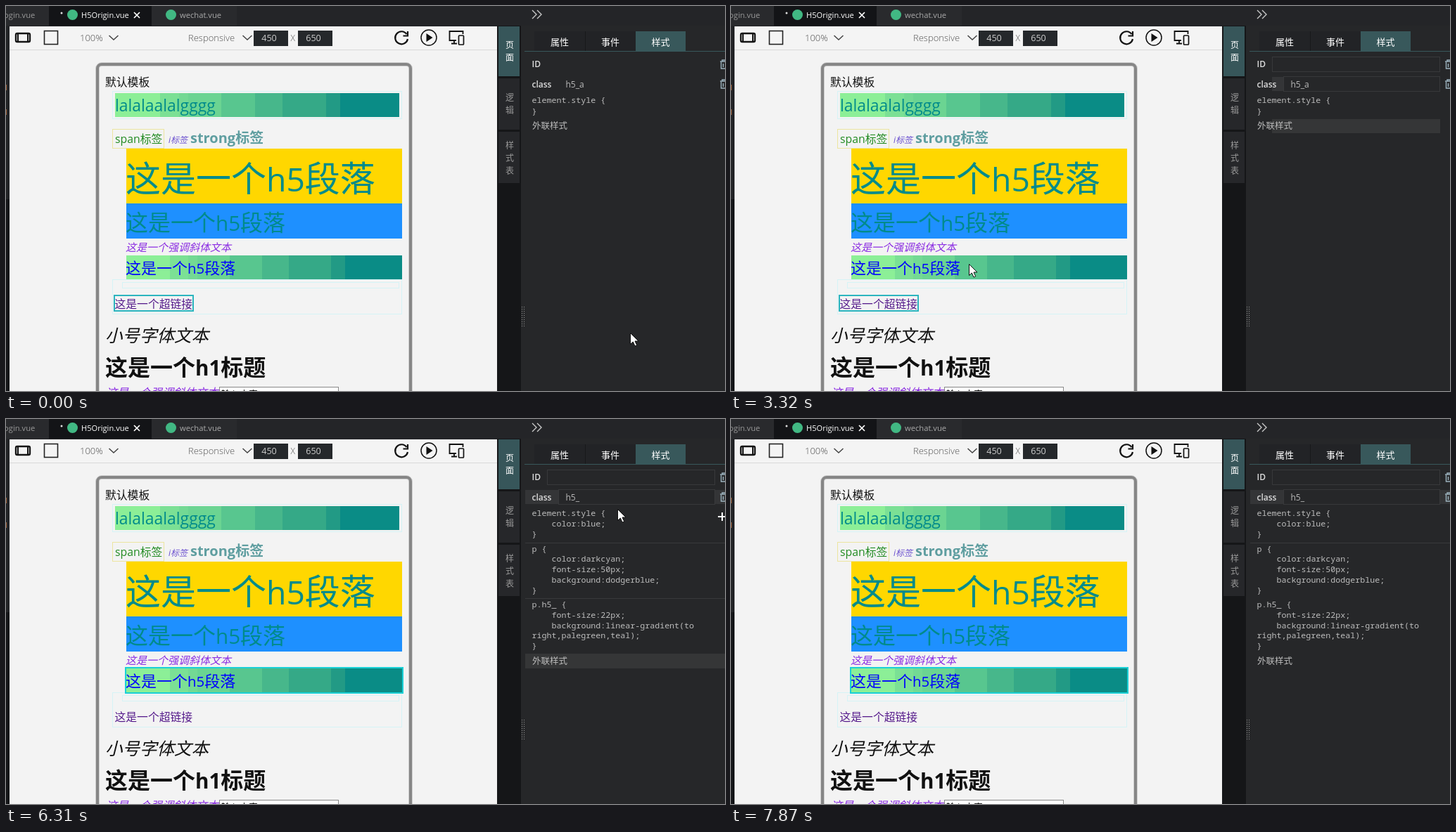
An HTML page for the animation above (8430 ms loop, 1022x548 px).

```html
<!DOCTYPE html>
<html lang="zh-CN">
<head>
<meta charset="utf-8">
<title>H5 style editor</title>
<style>
  html, body { margin: 0; width: 100%; height: 100%; overflow: hidden; background: #252629; }
  svg { display: block; width: 100%; height: 100%; }
  text { font-family: 'Open Sans', 'Noto Sans CJK SC', 'Noto Sans CJK', sans-serif; white-space: pre; }
  .code { font: 11.65px 'Noto Sans Mono', 'DejaVu Sans Mono', monospace; fill: #bdbdbd; }
</style>
</head>
<body>
<svg id="stage" viewBox="0 0 1022 548" preserveAspectRatio="none"></svg>
<script>
const LOOP = 8430;
const stage = document.getElementById('stage');

// Drawing helpers
const rect = (x, y, w, h, fill, extra = '') =>
  `<rect x="${x}" y="${y}" width="${w}" height="${h}" fill="${fill}" ${extra}/>`;
const frame = (x, y, w, h, color, width = 1, extra = '') =>
  rect(x, y, w, h, 'none', `stroke="${color}" stroke-width="${width}" ${extra}`);
const line = (d, color, width = 1, fill = 'none') =>
  `<path d="${d}" fill="${fill}" stroke="${color}" stroke-width="${width}"/>`;
const text = (s, x, y, size, fill, extra = '') =>
  `<text x="${x}" y="${y}" font-size="${size}" fill="${fill}" ${extra}>${s}</text>`;
const group = (id, body) => `<g id="${id}">${body}</g>`;
const bold = 'font-weight="700"', semi = 'font-weight="600"', light = 'font-weight="300"';
const italic = 'font-style="italic"', mid = 'text-anchor="middle"';

const heading = (a, b, c, x, y, size, fill, extra) =>
  text(`${a}<tspan font-size=".925em">${b}</tspan>${c}`, x, y, size, fill, extra);
const paragraph = (y, size, fill) => heading('这是一个', 'h5', '段落', 170, y, size, fill);

const code = (lines, y) => lines.map((s, i) => {
  const indent = s.startsWith('  ') ? 28 : 0;
  return `<text class="code" x="${747.5 + indent}" y="${y + i * 14.8}">${s.trim()}</text>`;
}).join('');

const bands = () => {
  const edges = [0, .158, .225, .257, .375, .493, .59, .743, .793, 1];
  const colors = ['#8cef97', '#7be095', '#73d994', '#6bd492', '#58c68f', '#47b78b', '#35a987', '#229a85', '#0a8c86'];
  return '<linearGradient id="bands">' + colors.map((c, i) =>
    `<stop offset="${edges[i]}" stop-color="${c}"/><stop offset="${edges[i + 1]}" stop-color="${c}"/>`
  ).join('') + '</linearGradient>';
};

const trash = y => line(`M1015 ${y + 2}h10M1018 ${y + 2}v-2h6M1016.5 ${y + 3}v9h8M1019.5 ${y + 5}v5`, '#9db4c0', 1.4);
const plus = (x, y) => line(`M${x - 6} ${y}h12M${x} ${y - 6}v12`, '#fff', 2);
const chevron = (x, y) => line(`M${x} ${y}l6.5 6 6.5-6`, '#444', 1.5);

function tabs() {
  return rect(0, 0, 1022, 29, '#242528')
    + rect(0, 0, 328, 28, '#292a2d') + rect(61, 0, 146, 28, '#131417')
    + text('ogin.vue', -3, 17, 11.2, '#999')
    + '<circle cx="79" cy="10" r="1.5" fill="#ddd"/>'
    + '<circle cx="94.500" cy="12.500" r="7.500" fill="#41b883"/><circle cx="234.500" cy="12.500" r="7.500" fill="#41b883"/>'
    + text('H5Origin.vue', 107, 17, 11.1, '#fff')
    + line('M182 9l8 8m0-8l-8 8', '#fff', 1.7)
    + text('wechat.vue', 247, 17, 11.2, '#aaa')
    + line('M748 6l6 6-6 6M755 6l6 6-6 6', '#c8c8c8', 1.4);
}

function toolbar() {
  const field = (x, s) => rect(x, 35, 49, 22, '#25282b') + text(s, x + 22, 50, 12.6, '#ccc', mid);
  return rect(5, 28, 694, 35, '#f4f4f4') + rect(5, 62, 694, 1, '#d8d8d8')
    + frame(14, 39, 20, 12, '#151515', 2.4, 'rx="2"') + line('M17 39v12M31 39v12', '#151515', 2)
    + frame(54.5, 35.5, 19, 19, '#222', 1.6)
    + text('100%', 105, 50, 13, '#555', light) + chevron(146.500, 42)
    + text('Responsive', 259, 50, 13, '#555', light) + chevron(336.500, 42)
    + field(352, '450') + text('X', 404.500, 50, 12, '#555', light) + field(415, '650')
    + line('M569.500 40a9 9 0 1 0 1.500 7', '#111', 2.2) + line('M571 36v6.500h-6.500', '#111', 2.2)
    + '<circle cx="601" cy="45" r="11" fill="none" stroke="#111" stroke-width="1.500"/>'
    + '<path d="M597.500 39l9 6-9 6z" fill="#111"/>'
    + line('M640 49h-9.500v-13h19v4M633 53.500h8M637 49v4', '#111', 1.8)
    + rect(642, 41, 10, 15, '#f4f4f4') + frame(643.500, 42, 7, 13, '#111', 1.7, 'rx="1"');
}

function phone() {
  const pale = '#d5f3f6', teal = '#008b8b', violet = '#8a2be2';
  return frame(130, 83, 445, 500, '#d0d0d0', 6, 'rx="6"')
    + frame(130, 83, 445, 500, '#868686', 4, 'rx="6"')
    + text('默认模板', 141, 114, 15.8, '#111')
    + frame(151.5, 121.5, 411, 39, pale) + rect(155, 124, 404, 34, 'url(#bands)')
    + text('lalalaalalgggg', 155, 149.5, 22.9, teal)
    + frame(151.5, 175.5, 73, 27, '#ece5a0')
    + text('span标签', 155, 195, 15.8, '#228b22')
    + text('i标签', 231, 195, 12, '#6a4fcf', italic)
    + text('strong标签', 262, 195, 20, '#5f9ea0', bold)
    + rect(171, 203, 392, 78, '#ffd700') + rect(171, 281, 392, 50, '#1e90ff')
    + group('matched', rect(171, 203, 392, 128, '#b8d5eb'))
    + paragraph(263.5, 50, teal) + paragraph(319.5, 32, teal)
    + text('这是一个强调斜体文本', 170, 349, 15, violet, italic)
    + rect(171, 355, 392, 34, 'url(#bands)')
    + frame(151.5, 389.500, 411, 49, pale) + frame(165.5, 393.5, 393, 8, pale)
    + group('pickPara', frame(170, 354, 394, 36, '#1bd0d6', 2))
    + paragraph(381, 22, '#0000ff')
    + group('pickLink', frame(154, 412, 112, 22, '#2cb5bf', 2))
    + text('这是一个超链接', 154.500, 430, 15.8, '#551a8b')
    + text('小号字体文本', 141, 478, 24.5, '#111', italic)
    + heading('这是一个', 'h1', '标题', 141, 526, 32, '#111', bold)
    + text('这是一个强调斜体文本', 142, 556, 16, violet, italic)
    + rect(303.5, 542.5, 169, 20, '#fff', 'stroke="#888"')
    + text('输入内容', 306, 556.5, 13, '#111');
}

function sideTabs() {
  const tab = (y, h, fill, ink, chars, first) => rect(700, y, 30, h, fill)
    + [...chars].map((c, i) => text(c, 716, first + i * 18, 12, ink, mid)).join('');
  return rect(698, 28, 34, 520, '#151618')
    + tab(29, 71, '#37565a', '#fff', '页面', 60)
    + tab(103, 73, '#26272a', '#999', '逻辑', 135)
    + tab(179, 73, '#26272a', '#999', '样式表', 203);
}

function panel() {
  let grip = '';
  for (let y = 428; y < 458; y += 3) grip += rect(733, y, 1, 1, '#999') + rect(736, y, 1, 1, '#999');
  const external = y => text('外联样式', 748, y, 12.5, '#bdbdbd');
  const label = (s, x) => text(s, x, 56, 13, '#fff', `${mid} font-weight="500"`);
  return rect(732, 28, 290, 520, '#262729') + grip
    + rect(751, 36, 144, 28, '#222326') + rect(823, 36, 1, 28, '#17181a')
    + rect(895, 36, 71, 28, '#38585b') + rect(737, 64, 285, 1, '#38585b')
    + label('属性', 787) + label('事件', 859) + label('样式', 930.5)
    + group('inputs', rect(769, 101, 16, 20, '#343537')
      + frame(769.5, 72.5, 238, 21, '#38393b') + frame(785.5, 100.5, 222, 21, '#38393b'))
    + group('pickedRow', rect(738, 101, 47, 20, '#343537') + rect(1008, 101, 14, 20, '#343537'))
    + text('ID', 747.5, 87, 12, '#ddd', semi) + text('class', 747.5, 115.5, 12, '#ddd', semi)
    + `<text id="cls" x="795.500" y="115.500" font-size="12" fill="#bbb"></text>`
    + trash(77) + trash(105)
    + code(['element.style {'], 138)
    + group('plain', rect(769, 161, 239, 20, '#353637', 'id="hoverBar"')
      + code(['}'], 153.5) + external(175))
    + group('rules', code(['  color:blue;', '}'], 153)
      + rect(738, 176, 284, 1, '#38393b')
      + code(['p {', '  color:darkcyan;', '  font-size:50px;', '  background:dodgerblue;', '}'], 188.5)
      + code(['p.h5_ {', '  font-size:22px;', '  background:linear-gradient(to', 'right,palegreen,teal);', '}'], 268)
      + group('marks', rect(738, 255, 284, 1, '#38393b') + rect(738, 334, 284, 21, '#353637'))
      + external(348.5))
    + group('addStyle', plus(1018, 139))
    + group('addP', plus(995, 189) + trash(183))
    + group('addClass', plus(995, 268) + trash(262));
}

stage.innerHTML = `<defs>${bands()}</defs>`
  + rect(0, 0, 1022, 548, '#f3f3f3')
  + rect(0, 28, 5, 520, '#141518') + rect(0, 28, 5, 247, '#222326')
  + rect(0, 112, 1, 8, '#a5673f') + rect(0, 147, 1, 8, '#a5673f')
  + phone() + toolbar() + tabs() + sideTabs() + panel()
  + group('cursor', line('M.5 .5v16l3.800-3.500 2.700 6 2.700-1.200-2.700-5.800h5z', '#111', 1, '#fff'));

// Screen updates come in runs: start, end, steps
const runs = [
  [130, 1100, 8], [1220, 1640, 4], [2070, 3050, 8], [3170, 3740, 5],
  [4420, 4420, 1], [4940, 5880, 8], [6030, 7000, 8], [7150, 7870, 6]
];
const ticks = [0];
for (const [a, b, n] of runs)
  for (let i = 0; i < n; i++) ticks.push(a + (n > 1 ? i * (b - a) / (n - 1) : 0));

// Pointer path: time, x, y
const path = [
  [0, 887, 465], [130, 884, 470], [400, 859, 420], [680, 880, 270], [1100, 941, 92],
  [1220, 936, 92], [1360, 915, 172], [1500, 900, 330], [1640, 895, 424],
  [2070, 869, 517], [2350, 720, 480], [2770, 470, 400], [3050, 388, 366],
  [3740, 257, 369], [4800, 257, 369], [5080, 400, 400], [5360, 700, 432],
  [5640, 880, 250], [5745, 890, 108], [5880, 870, 140], [6307, 869, 128],
  [6446, 878, 220], [6584, 883, 347], [6723, 884, 431], [6861, 870, 330],
  [7000, 862, 290], [7294, 842, 225], [7582, 832, 199], [7726, 880, 483]
];

function pointer(t) {
  const i = path.findIndex(p => p[0] > t);
  if (i < 0) return path[path.length - 1].slice(1);
  const [t0, x0, y0] = path[i - 1], [t1, x1, y1] = path[i];
  const k = (t - t0) / (t1 - t0);
  return [Math.round(x0 + (x1 - x0) * k), Math.round(y0 + (y1 - y0) * k)];
}

const part = id => document.getElementById(id);
const show = (id, on) => part(id).setAttribute('display', on ? 'inline' : 'none');

function draw(time) {
  let t = 0;
  for (const tick of ticks) if (tick <= time + 13) t = tick;
  const [x, y] = pointer(t);
  const picked = t >= 4420;
  const over = (top, bottom) => t >= 4940 && t < 7860 && x > 738 && y >= top && y < bottom;

  part('cursor').setAttribute('transform', `translate(${x} ${y})`);
  show('cursor', t < 7860);
  part('cls').textContent = picked ? 'h5_' : 'h5_a';
  show('inputs', t >= 1220);
  show('hoverBar', t >= 1350);
  show('plain', !picked);
  show('rules', picked);
  show('pickedRow', picked);
  show('pickPara', picked);
  show('pickLink', !picked);
  show('marks', t < 6440);
  show('matched', over(177, 252));
  show('addStyle', over(125, 172));
  show('addP', over(177, 252));
  show('addClass', over(257, 331));
}

const start = performance.now();
function loop() {
  draw((performance.now() - start) % LOOP);
  requestAnimationFrame(loop);
}
loop();
</script>
</body>
</html>
```
